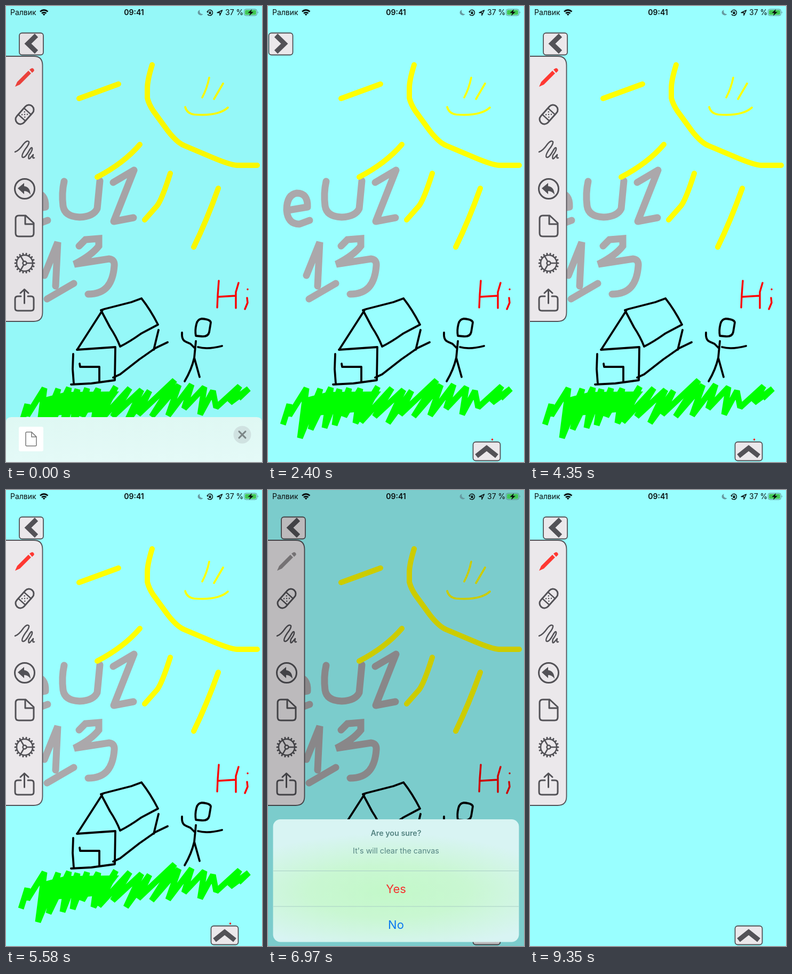
An HTML page for the animation above (9.42 s loop, 480 by 853 pixels).

```html
<!DOCTYPE html>
<html lang="en">
<head>
<meta charset="utf-8">
<title>Drawing app</title>
<style>
html, body { margin: 0; width: 100%; height: 100%; overflow: hidden; background: #9ff; }
svg { display: block; width: 100%; height: 100%; font-family: Inter, Roboto, sans-serif; }
.ink { fill: none; stroke-linecap: round; stroke-linejoin: round; }
.icon { fill: none; stroke: #535257; stroke-width: 3; stroke-linecap: round; stroke-linejoin: round; }
.thin { stroke-width: 2.5; }
.solid { fill: #535257; stroke: none; }
.panel { fill: #ebe8eb; stroke: #535257; stroke-width: 1.8; }
.chevron { fill: none; stroke: #535257; stroke-width: 9; }
</style>
</head>
<body>
<svg viewBox="0 0 480 853" preserveAspectRatio="none">
  <defs>
    <radialGradient id="glow" cx=".47" cy=".59" r=".72" gradientTransform="translate(0 .2) scale(1 .66)">
      <stop offset="0" stop-color="#c3f8c9"/>
      <stop offset=".45" stop-color="#c9f7d2"/>
      <stop offset="1" stop-color="#d8f4f3"/>
    </radialGradient>
    <linearGradient id="frost" x2="0" y2="1">
      <stop offset="0" stop-color="#dff8f3"/>
      <stop offset="1" stop-color="#e5faf8"/>
    </linearGradient>
  </defs>
  <rect width="480" height="853" fill="#9ff"/>

  <g id="drawing">
    <g class="ink" stroke="#aba8ab" stroke-width="13">
      <path d="M38 382L74 376Q75 350 54 350Q35 353 35 382Q37 408 59 408L78 401"/>
      <path d="M109 328Q104 350 107 374Q110 394 138 395Q164 394 171 379L176 327"/>
      <path d="M201 330L240 307L202 403L239 396"/>
      <path d="M72 504L97 442L93 524M77 548L127 519" stroke-linejoin="miter" stroke-miterlimit="4"/>
      <path d="M137 449L149 437L174 435L174 449Q160 467 128 483L193 473Q204 474 203 486Q201 512 190 525Q178 539 154 539" stroke-linejoin="miter" stroke-miterlimit="5"/>
    </g>
    <g class="ink" stroke="#ff0" stroke-width="10">
      <path d="M274 110Q265 139 265 154V172Q268 184 276 196L303 233Q320 255 334 261L391 285Q420 297 433 298H471"/>
      <path d="M137 173L211 146M171 320Q221 294 251 259M308 313Q292 363 283 374L260 400M398 341Q376 402 352 451"/>
      <path d="M336 189Q339 201 353 203Q381 205 397 200Q408 197 416 190M381 134Q377 154 368 171M407 145L390 174" stroke-width="3.700"/>
    </g>
    <g fill="#0f0">
      <path d="M62 735L112 722L212 721L184 758L70 768Z"/>
      <path fill="none" stroke="#0f0" stroke-width="11" stroke-linejoin="bevel" d="M28 783L40 745L40 766L72 715L60 808L98 716L80 792L118 714L106 789L134 717L125 784L152 715L143 768L173 716L164 780L206 712L174 778L232 715L200 768L254 718L225 780L269 720L248 764L316 700L273 768L324 709L304 766L348 708L334 753L372 713L364 764L388 720L394 751L438 711L420 742L455 716L436 734"/>
    </g>
    <g class="ink" stroke="#000" stroke-width="3.800">
      <path d="M134 642L181 569M178 569L195 601Q207 619 214 637Q232 628 253 613L285 596Q270 567 254 547M178 569L184 567L235 554L254 547"/>
      <path d="M126 651L125 679L127 706M133 643L205 638L204 700L160 706L122 708M138 669L139 675H175V704"/>
      <path d="M286 606L277 643M201 695L214 689L250 661L280 640L303 629"/>
      <path d="M357 595Q359 586 367 585Q383 586 384 592L381 610Q379 619 367 618L356 617Q354 607 357 595"/>
      <path d="M356 627L353 658Q348 680 335 702M353 658L363 694M330 611Q329 625 337 628L346 632L354 640M360 638Q378 643 405 636"/>
    </g>
    <path class="ink" stroke="red" stroke-width="3.400" d="M399 514L397 541L396 564M398 544L431 542M436 518L431 535V565M453 530h.1M452 546L453 555L448 567M420.500 811h.1"/>
  </g>

  <g id="tools">
    <path class="panel" d="M-4 94H52Q68.500 94 68.500 111V573Q68.500 590 52 590H-4Z"/>
    <path id="pencil" d="M17 151L21 142L42 121L47 126L26 147ZM44 119L47 117Q50 115 52 118Q54 121 51 123L49 125Z"/>
    <g class="icon" transform="translate(35 203) rotate(-48)">
      <rect x="-21" y="-9" width="42" height="18" rx="9"/>
      <path class="thin" d="M-8 -9V9M8 -9V9"/>
      <path class="thin" d="M-3.500 -3.500h.1M3.500 -3.500h.1M-3.500 3.500h.1M3.500 3.500h.1M0 0h.1"/>
    </g>
    <path class="icon thin" d="M17 273Q24 271 33 258Q40 250 43 254Q44 258 36 268Q28 280 31 283Q35 285 42 273Q48 262 49 266Q50 270 43 279Q41 288 45 285L51 278Q49 286 53 284"/>
    <circle class="icon" cx="35" cy="342" r="18.500"/>
    <path class="solid" d="M22 341L34 331V337Q45 338 46 353Q41 346 34 346V352Z"/>
    <path class="icon" d="M24 392H37L52 406V425Q52 431 46 431H24Q18 431 18 425V398Q18 392 24 392ZM36 393V408H51"/>
    <g class="icon" transform="translate(35 481)">
      <circle class="thin" r="15"/>
      <circle class="thin" r="3.500"/>
      <path class="thin" d="M4 0H15M-2 -3.500L-7.500 -13M-2 3.500L-7.500 13"/>
      <path id="teeth"/>
    </g>
    <path class="icon" d="M28 543H22Q17 543 17 548V565Q17 570 22 570H47Q52 570 52 565V548Q52 543 47 543H41M34.500 556V531M27 537L34.500 530L42 537"/>
  </g>

  <g id="toggle">
    <rect class="panel" x="25" y="50.500" width="45" height="41" rx="5"/>
    <path id="arrow" class="chevron" d="M57 55L41 70.500L57 86"/>
  </g>
  <rect class="panel" x="384.500" y="815.500" width="51" height="35" rx="5"/>
  <path class="chevron" d="M391 842L410 827L429 842"/>

  <rect id="shade" width="480" height="853"/>

  <g id="sheet">
    <path d="M0 100V10Q0 0 10 0H470Q480 0 480 10V100Z" fill="url(#frost)"/>
    <rect x="24" y="18" width="46" height="46" rx="3" fill="#fff"/>
    <path d="M39 28H48L57 37V52Q57 54 55 54H39Q37 54 37 52V30Q37 28 39 28ZM48 28V37H57" fill="none" stroke="#777" stroke-width="1.500"/>
    <circle cx="443" cy="33" r="16.500" fill="#d0e2e1"/>
    <path d="M437 27L449 39M449 27L437 39" stroke="#7b8586" stroke-width="3" stroke-linecap="round"/>
  </g>

  <g id="dialog" text-anchor="middle">
    <rect x="9.500" y="616" width="461" height="229.500" rx="14" fill="url(#glow)"/>
    <path d="M10 712.500H470M10 779H470" stroke="#a9cfc5"/>
    <g font-size="14.300" fill="#558582">
      <text x="240" y="647" font-weight="600">Are you sure?</text>
      <text x="240" y="680">It's will clear the canvas</text>
    </g>
    <g font-size="22">
      <text x="240" y="754" fill="#f5302e">Yes</text>
      <text x="240" y="820.500" fill="#0a78f0">No</text>
    </g>
  </g>

  <g id="status" fill="#080d0d">
    <text x="8" y="17" font-size="14">Ралвик</text>
    <path d="M64 10.500Q71 4.500 78.500 10.500M67 13.700Q71 10.500 75.500 13.700" fill="none" stroke="#080d0d" stroke-width="2.700"/>
    <path d="M68.700 15.500Q71.200 13.500 73.700 15.500L71.200 18Z"/>
    <text x="240" y="17" font-size="14" font-weight="600" text-anchor="middle">09:41</text>
    <path d="M363.500 7Q361 14 369.500 15.500Q366 19 361.500 16Q356.500 11 363.500 7Z" fill="#6799a0"/>
    <path d="M378 9.500A5.200 5.200 0 1 1 378 15.500" fill="none" stroke="#080d0d" stroke-width="1.400"/>
    <path d="M376 10L380 10L378 13ZM380.500 11.500H384.500V15H380.500Z"/>
    <path d="M381.200 12V10.600Q382.500 8.600 383.800 10.600V12" fill="none" stroke="#080d0d"/>
    <path d="M396 12.500L405.500 8L401 17.500V12.500Z" fill="none" stroke="#080d0d" stroke-width="1.400" stroke-linejoin="round"/>
    <text x="411" y="17" font-size="14">37 %</text>
    <rect x="446.500" y="6" width="24" height="12" rx="3.500" fill="none" stroke="#5a8d8d"/>
    <rect x="448" y="7.500" width="21" height="9" rx="2" fill="#42c755"/>
    <path d="M472 10Q474 12 472 14Z" fill="#5a8d8d"/>
    <path d="M461 6L453.500 13H458L456 18.500L464 11H459.500Z"/>
  </g>
</svg>
<script>
const LOOP = 9420;
const $ = id => document.getElementById(id);
const clamp = v => Math.min(1, Math.max(0, v));
const ramp = (t, start, length) => clamp((t - start) / length);
const smooth = p => p * p * (3 - 2 * p);
const easeOut = p => 1 - (1 - p) ** 3;
const mix = (a, b, p) => a + (b - a) * p;
const shift = (id, x, y) => $(id).setAttribute('transform', `translate(${x} ${y})`);
const show = (id, on) => $(id).setAttribute('display', on ? 'inline' : 'none');

$('teeth').setAttribute('d', Array.from({ length: 18 }, (_, i) => {
  const a = i * Math.PI / 9, x = Math.cos(a), y = Math.sin(a);
  return `M${x * 16} ${y * 16}L${x * 18} ${y * 18}`;
}).join(''));

function draw(t) {
  // share sheet leaving
  const leave = easeOut(ramp(t, 0, 300));
  shift('sheet', 0, mix(768, 860, leave));
  show('sheet', leave < 1);

  // side toolbar
  const hidden = smooth(ramp(t, 1600, 300)) - smooth(ramp(t, 3000, 300));
  shift('tools', -72 * hidden, 0);
  shift('toggle', -23.5 * hidden, 0);
  $('arrow').setAttribute('transform', hidden > 0.5 ? 'translate(95.5 0) scale(-1 1)' : '');

  // confirmation dialog
  const open = easeOut(ramp(t, 5600, 450)) - easeOut(ramp(t, 7030, 320));
  shift('dialog', 0, 240 * (1 - open));
  show('dialog', open > 0);

  const dim = Math.max(open, 0.13 * (1 - leave));
  $('shade').setAttribute('fill-opacity', 0.2 * dim);
  const tint = [mix(255, 146, dim), mix(56, 142, dim), mix(50, 145, dim)].map(Math.round);
  $('pencil').setAttribute('fill', `rgb(${tint})`);

  show('drawing', t < 7350);
}

const begin = performance.now();
function tick() {
  draw((performance.now() - begin) % LOOP);
  requestAnimationFrame(tick);
}
tick();
</script>
</body>
</html>
```
